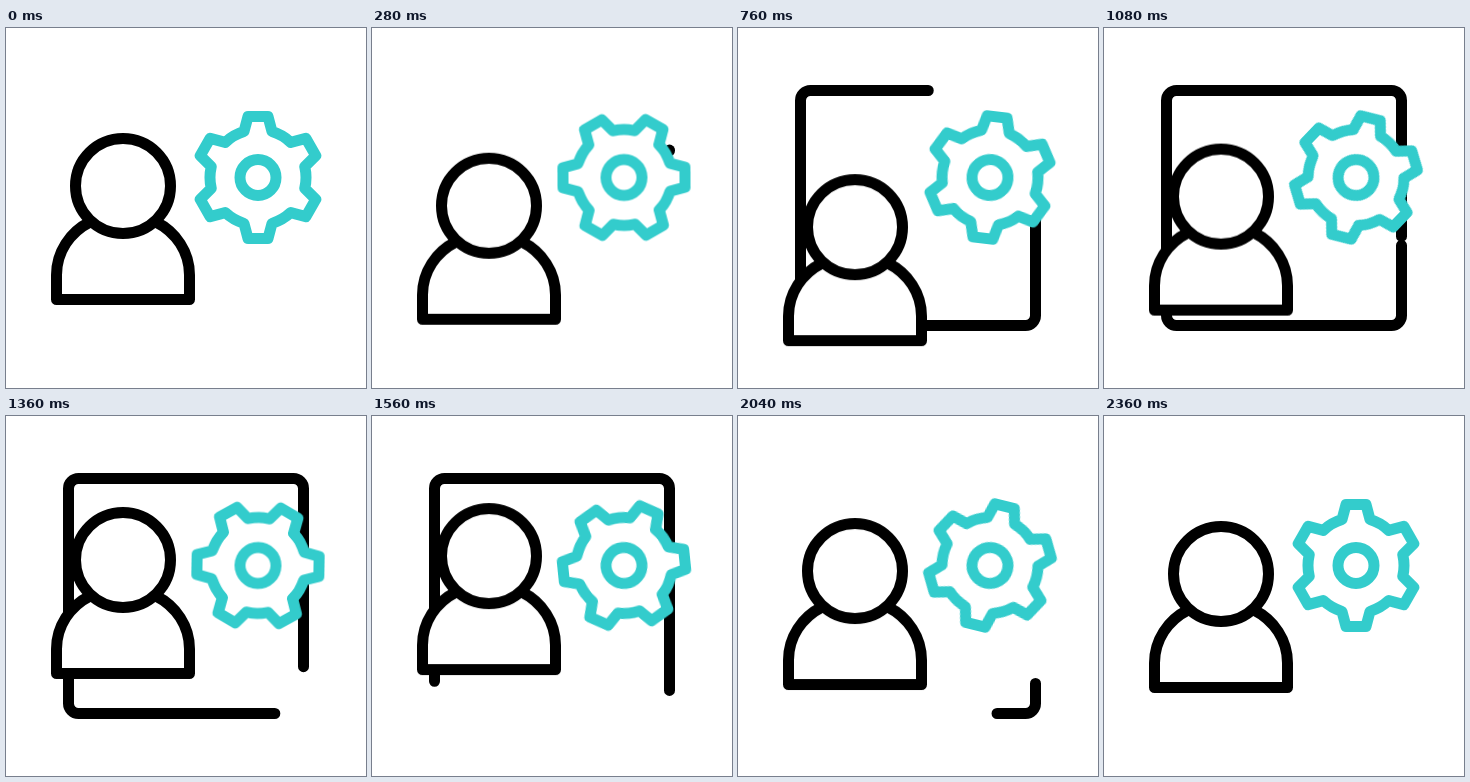
Write an HTML page that moves like this. It is 360 by 360 pixels and loops after 2480 ms.

```html
<!DOCTYPE html>
<html lang="en">
<head>
<meta charset="utf-8">
<title>User settings</title>
<style>
  @property --start { syntax: "<number>"; inherits: false; initial-value: 0; }
  @property --end { syntax: "<number>"; inherits: false; initial-value: 0; }
  @property --turn { syntax: "<number>"; inherits: false; initial-value: 0; }

  html, body { margin: 0; width: 100%; height: 100%; overflow: hidden; background: #fff; }
  svg {
    display: block; width: 100%; height: 100%;
    fill: #fff; stroke: #000; stroke-width: 11;
    stroke-linecap: round; stroke-linejoin: round;
    --loop: 2480ms infinite;
    --settle: cubic-bezier(.333, 0, .25, 1);
  }

  /* The border is a dash that grows, then shrinks, while drifting clockwise. */
  .border {
    fill: none;
    --len: calc(var(--end) - var(--start));
    stroke-dasharray: calc(var(--len) * 1px) calc((100 - var(--len)) * 1px);
    stroke-dashoffset: calc((var(--start) + var(--turn)) * -1px);
    animation: grow var(--loop), shrink var(--loop), drift var(--loop) linear, show var(--loop) step-end;
  }
  .user { animation: bob var(--loop) var(--settle); }
  .gear {
    stroke: #33cccc;
    transform-origin: 252px 149.5px;
    animation: spin var(--loop) var(--settle);
  }

  @keyframes grow {
    0% { --end: 0; }
    10.77% { --end: 0; animation-timing-function: cubic-bezier(.333, 0, .35, 1); }
    47.5%, 100% { --end: 100; }
  }
  @keyframes shrink {
    0% { --start: 0; }
    47.9% { --start: 0; animation-timing-function: cubic-bezier(.333, 0, .667, 1); }
    88.9%, 100% { --start: 100; }
  }
  @keyframes drift {
    from { --turn: 1.75; }
    to { --turn: 33.75; }
  }
  @keyframes show {
    0% { visibility: hidden; }
    11% { visibility: visible; }
    88.7%, 100% { visibility: hidden; }
  }
  @keyframes bob {
    0%, .81% { transform: translateY(0); }
    32.26% { transform: translateY(41.2px); }
    64.5% { transform: translateY(-18px); }
    96%, 100% { transform: translateY(0); }
  }
  @keyframes spin {
    0%, .81% { transform: rotate(0deg); }
    32.26% { transform: rotate(187deg); }
    64.5% { transform: rotate(84deg); }
    96%, 100% { transform: rotate(0deg); }
  }
</style>
</head>
<body>
<svg viewBox="0 0 360 360">
  <path class="border" pathLength="100" d="M297.5 72.5V287.5A10 10 0 0 1 287.5 297.5H72.5A10 10 0 0 1 62.5 287.5V72.5A10 10 0 0 1 72.5 62.5H287.5A10 10 0 0 1 297.5 72.5Z"/>
  <g class="user">
    <path d="M84 194C64 204 50.5 224 50.5 247V271.5H183.5V247C183.5 224 170 204 150 194"/>
    <circle cx="117" cy="158" r="47.5"/>
  </g>
  <g class="gear">
    <path id="teeth"/>
    <circle cx="252" cy="149.5" r="18"/>
  </g>
</svg>
<script>
  // Six tapered teeth joined by arcs of the hub circle.
  const hub = 48, tip = 61.8;
  const at = (r, deg) => {
    const a = deg * Math.PI / 180;
    return `${(252 + r * Math.sin(a)).toFixed(2)} ${(149.5 - r * Math.cos(a)).toFixed(2)}`;
  };
  let d = "";
  for (let a = 0; a < 360; a += 60) {
    d += `${a ? `A${hub} ${hub} 0 0 1 ` : "M"}${at(hub, a - 17)}`;
    d += `L${at(tip, a - 9.3)}L${at(tip, a + 9.3)}L${at(hub, a + 17)}`;
  }
  document.getElementById("teeth").setAttribute("d", `${d}A${hub} ${hub} 0 0 1 ${at(hub, -17)}Z`);
</script>
</body>
</html>
```
